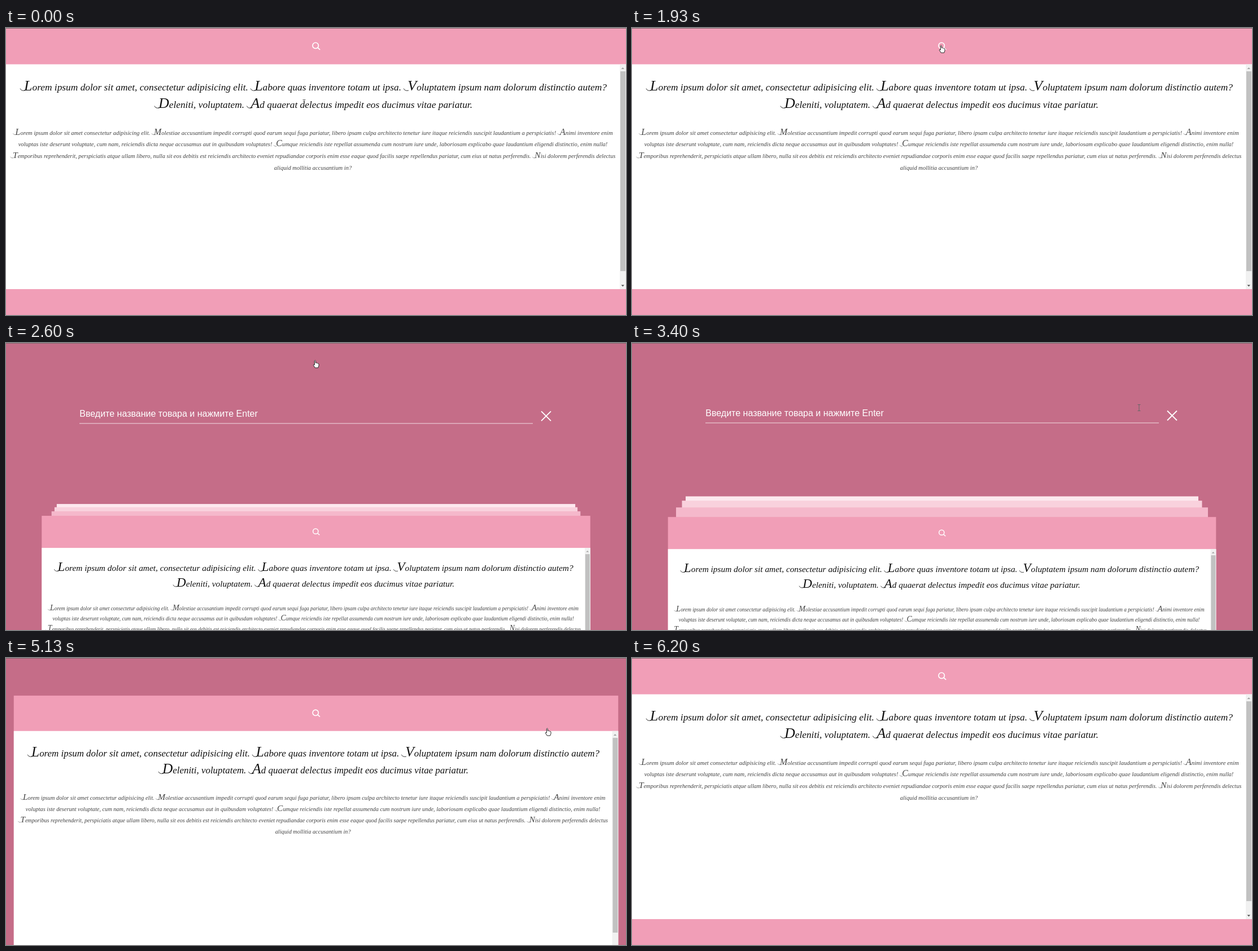
An HTML page with a canvas for the animation above (6.87 s loop, 1098 by 510 pixels).

```html
<!DOCTYPE html>
<html lang="ru">
<head>
<meta charset="utf-8">
<title>Search overlay</title>
<style>
  html, body { margin: 0; width: 100%; height: 100%; overflow: hidden; background: #c56c88; }
  canvas { display: block; }
</style>
</head>
<body>
<canvas id="stage" width="1098" height="510"></canvas>
<script>
const W = 1098, H = 510, LOOP = 6870, STEP = 1000 / 15;
const ctx = document.getElementById('stage').getContext('2d');

const PINK = '#f19eb7', ROSE = '#c56d88';
const OPEN_AT = 2336, FAN_AT = 2557, CLOSE_AT = 5000;
const HEADER = 64.5, FOOTER = 464, COLUMN = 1072;

const HEADING = [
  'Lorem ipsum dolor sit amet, consectetur adipisicing elit. Labore quas inventore totam ut ipsa. Voluptatem ipsum nam dolorum distinctio autem?',
  'Deleniti, voluptatem. Ad quaerat delectus impedit eos ducimus vitae pariatur.'
];
const BODY = [
  'Lorem ipsum dolor sit amet consectetur adipisicing elit. Molestiae accusantium impedit corrupti quod earum sequi fuga pariatur, libero ipsam culpa architecto tenetur iure itaque reiciendis suscipit laudantium a perspiciatis! Animi inventore enim',
  'voluptas iste deserunt voluptate, cum nam, reiciendis dicta neque accusamus aut in quibusdam voluptates! Cumque reiciendis iste repellat assumenda cum nostrum iure unde, laboriosam explicabo quae laudantium eligendi distinctio, enim nulla!',
  'Temporibus reprehenderit, perspiciatis atque ullam libero, nulla sit eos debitis est reiciendis architecto eveniet repudiandae corporis enim esse eaque quod facilis saepe repellendus pariatur, cum eius ut natus perferendis. Nisi dolorem perferendis delectus',
  'aliquid mollitia accusantium in?'
];

// Sheets fanned out behind the page, back to front
const SHEETS = [
  { color: '#fde8ee', width: 908, rise: 36.7, delay: -13 },
  { color: '#f9d1dd', width: 921, rise: 29, delay: -7 },
  { color: '#f5b8cb', width: 942, rise: 17, delay: 0 }
];

// time, x, y, pointer kind used from that time on
const PATH = [
  [0, 528, 133, 'beam'], [400, 528, 133, 'beam'], [600, 472, 140, 'beam'],
  [733, 460, 143, 'beam'], [933, 505, 92, 'arrow'], [1133, 551, 43, 'hand'],
  [1200, 553, 43, 'hand'], [1467, 570, 42, 'hand'], [1867, 550, 38, 'hand'],
  [1933, 549, 37, 'hand'], [2600, 549, 37, 'hand'], [2867, 774, 113, 'beam'],
  [3067, 774, 113, 'beam'], [3400, 898, 115, 'beam'], [3533, 898, 115, 'beam'],
  [3867, 936, 121, 'arrow'], [4000, 952, 128, 'hand'], [4200, 960, 131, 'hand'],
  [5200, 960, 131, 'arrow'], [5533, 258, 328, 'arrow'], [5733, 258, 328, 'arrow'],
  [6200, 53, 512, 'arrow'], [LOOP, 53, 512, 'arrow']
];

const lerp = (a, b, k) => a + (b - a) * k;

// cubic-bezier(0.2, 1, 0.3, 1)
function easeOut(x) {
  if (x <= 0) return 0;
  if (x >= 1) return 1;
  let lo = 0, hi = 1;
  for (let i = 0; i < 24; i++) {
    const u = (lo + hi) / 2, v = 1 - u;
    if (0.6 * v * v * u + 0.9 * v * u * u + u * u * u < x) lo = u; else hi = u;
  }
  return 1 - (1 - lo) ** 3;
}

function rect(x, y, w, h, color) {
  ctx.fillStyle = color;
  ctx.fillRect(x, y, w, h);
}

function stroke(color, width, build) {
  ctx.strokeStyle = color;
  ctx.lineWidth = width;
  ctx.beginPath();
  build(ctx);
  ctx.stroke();
}

function polygon(points, color) {
  ctx.fillStyle = color;
  ctx.beginPath();
  points.forEach(([x, y]) => ctx.lineTo(x, y));
  ctx.closePath();
  ctx.fill();
}

// Splits a line into lowercase runs and larger capitals with room for a swash
function scriptRuns(text, size) {
  return text.split(/([A-Z])/).filter(Boolean).map(str => {
    const capital = /^[A-Z]$/.test(str);
    const font = `italic ${capital ? size * 1.5 : size}px "Liberation Serif", serif`;
    const lead = capital ? size * 0.4 : 0;
    ctx.font = font;
    return { str, capital, font, lead, width: ctx.measureText(str).width + lead };
  });
}

const totalWidth = runs => runs.reduce((sum, run) => sum + run.width, 0);

// Italic line centred on cx, shrunk when it would leave the column
function scriptLine(text, cx, y, size, color) {
  const natural = totalWidth(scriptRuns(text, size));
  const s = size * Math.min(1, COLUMN / natural);
  const runs = scriptRuns(text, s);
  let x = cx - totalWidth(runs) / 2;
  ctx.textAlign = 'left';
  for (const run of runs) {
    ctx.font = run.font;
    ctx.fillStyle = color;
    ctx.fillText(run.str, x + run.lead, y);
    if (run.capital) {
      stroke(color, s * 0.05, c => {
        c.moveTo(x + s * 0.5, y);
        c.quadraticCurveTo(x + s * 0.1, y + s * 0.08, x, y - s * 0.2);
      });
    }
    x += run.width;
  }
}

function drawPage(p) {
  const scale = 1 - 0.116 * p;
  ctx.save();
  ctx.translate(W / 2, H / 2 + 279.6 * p);
  ctx.scale(scale, scale);
  ctx.translate(-W / 2, -H / 2);

  rect(0, 0, W, H, PINK);
  rect(0, HEADER, W, FOOTER - HEADER, '#fff');

  stroke('#fff', 1.7, c => {
    c.arc(548.2, 31.2, 5.2, 0, Math.PI * 2);
    c.moveTo(552, 35);
    c.lineTo(556.2, 38.6);
  });

  HEADING.forEach((line, i) => scriptLine(line, 544.5, 111 + 31 * i, 17.35, '#111'));
  BODY.forEach((line, i) => scriptLine(line, 543.5, 189.5 + 20.7 * i, 10.55, '#444'));

  rect(1087, HEADER, 11, FOOTER - HEADER, '#f1f1f1');
  rect(1088, 77, 9, 355, '#c1c1c1');
  polygon([[1089.5, 73], [1092.3, 70], [1095, 73]], '#a3a3a3');
  polygon([[1089.5, 456.5], [1092.3, 459.5], [1095, 456.5]], '#505050');
  ctx.restore();
}

function drawSearch(p) {
  ctx.save();
  ctx.translate(0, 140 * (1 - p));
  ctx.fillStyle = '#fff';
  ctx.font = '16px "Liberation Sans", sans-serif';
  ctx.textAlign = 'left';
  ctx.fillText('Введите название товара и нажмите Enter', 130.3, 130);
  rect(130, 141.5, 803, 1, '#f3dde4');
  stroke('#fff', 1.8, c => {
    c.moveTo(948, 120.5);
    c.lineTo(965, 137.5);
    c.moveTo(965, 120.5);
    c.lineTo(948, 137.5);
  });
  ctx.restore();
}

function drawSheets(t, p) {
  if (t < FAN_AT - 20 || t >= CLOSE_AT) return;
  const top = 309.2 * p;
  for (const { color, width, rise, delay } of SHEETS) {
    const k = easeOut((t - FAN_AT - delay) / 400);
    const w = lerp(932, width, k);
    rect((W - w) / 2, top - rise * k, w, H, color);
  }
}

function outlined(path) {
  ctx.lineJoin = 'round';
  ctx.fillStyle = '#fff';
  ctx.fill(path);
  ctx.strokeStyle = '#222';
  ctx.lineWidth = 1;
  ctx.stroke(path);
}

const POINTERS = {
  beam: () => stroke('#666', 1, c => {
    c.moveTo(-2.5, -5.5); c.lineTo(2.5, -5.5);
    c.moveTo(0, -5.5); c.lineTo(0, 5.5);
    c.moveTo(-2.5, 5.5); c.lineTo(2.5, 5.5);
  }),
  arrow: () => outlined(new Path2D('M0 0V12.5L3 9.8L5 14.3L7 13.4L5 9H9Z')),
  hand: () => outlined(new Path2D(
    'M-2.6 2V-5.2Q-1.6-7-.6-5.2V-1.6Q.7-2.5 1.5-1.2Q2.7-1.8 3.3-.6Q4.8-1 5 .6V3.5L3.7 7H-1.7L-4.7 2.4Q-4.8 .4-2.6 2Z'))
};

function drawPointer(t) {
  const next = PATH.findIndex(point => point[0] > t);
  const [t0, x0, y0, kind] = PATH[next - 1];
  const [t1, x1, y1] = PATH[next];
  const k = (t - t0) / (t1 - t0);
  ctx.save();
  ctx.translate(lerp(x0, x1, k), lerp(y0, y1, k));
  POINTERS[kind]();
  ctx.restore();
}

function openness(t) {
  return t < CLOSE_AT
    ? easeOut((t - OPEN_AT) / 400)
    : 1 - easeOut((t - CLOSE_AT - 15) / 500);
}

function draw(t) {
  const p = openness(t);
  rect(0, 0, W, H, ROSE);
  if (p > 0) drawSearch(p);
  drawSheets(t, p);
  drawPage(p);
  rect(0, 0, W, 1, '#80686f');
  drawPointer(t);
}

const start = performance.now();
function frame() {
  const elapsed = (performance.now() - start) % LOOP;
  draw(Math.floor((elapsed + 5) / STEP) * STEP);
  requestAnimationFrame(frame);
}
frame();
</script>
</body>
</html>
```
